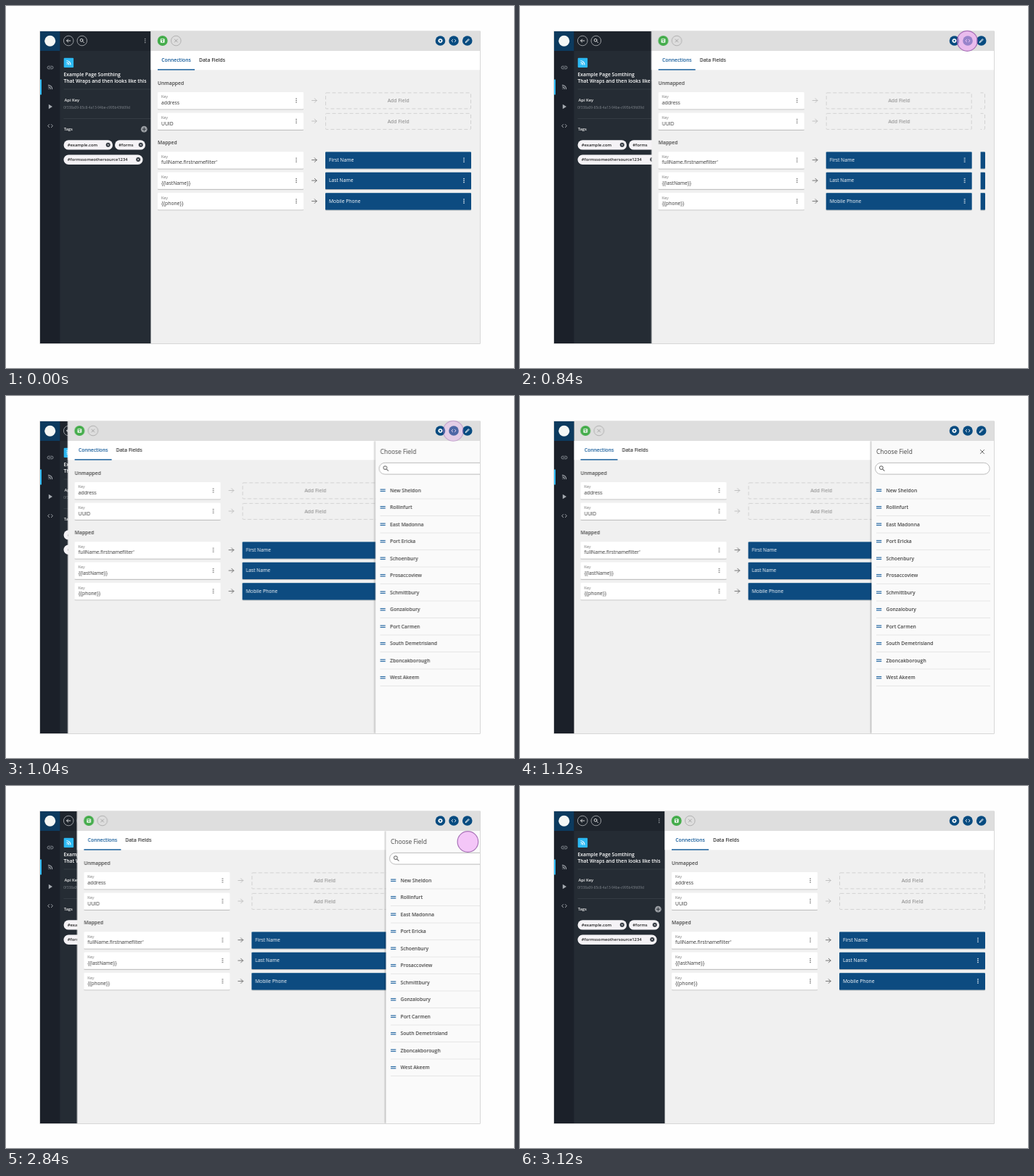
Write an HTML page that moves like this. It is 700 px wide and 500 px high and loops after 4.6 s.

```html
<!DOCTYPE html>
<html lang="en">
<head>
<meta charset="utf-8">
<title>Field mapping</title>
<style>
html, body { margin: 0; width: 100%; height: 100%; overflow: hidden; background: #fefefe; }
svg { display: block; width: 700px; height: 500px; font: 6.75px "Open Sans", sans-serif; }
.semi { font-weight: 600; }
.small { font-size: 5.8px; }
.line { fill: none; stroke: currentColor; stroke-linecap: round; stroke-linejoin: round; }
.panel { animation: slide 4.6s ease-in-out infinite; }
.drawer { animation: drawer 4.6s ease-in-out infinite; }
.tap {
  fill: #f0a6f7; stroke: #8f4fa3; stroke-width: 1.2;
  fill-opacity: 0; stroke-opacity: 0;
  animation: tap 4.6s linear infinite;
}
.open { animation-delay: .68s; }
.close { animation-delay: 2.68s; }
@keyframes slide {
  0%, 16.087% { transform: translateX(0); }
  24.348%, 59.13% { transform: translateX(-125.5px); }
  67.826%, 100% { transform: translateX(0); }
}
@keyframes drawer {
  0%, 16.087% { transform: translateX(278px); }
  24.348%, 59.13% { transform: translateX(0); }
  67.826% { transform: translateX(205px); }
  67.83%, 100% { transform: translateX(278px); }
}
@keyframes tap {
  0% { fill-opacity: 0; stroke-opacity: .35; }
  3.5% { fill-opacity: .62; stroke-opacity: .75; }
  5.2% { fill-opacity: .72; stroke-opacity: .95; }
  6.1% { fill-opacity: .62; stroke-opacity: .7; }
  9.565%, 100% { fill-opacity: 0; stroke-opacity: 0; }
}
</style>
</head>
<body>
<svg id="stage" viewBox="0 0 700 500"></svg>
<script>
const NAVY = '#074b80', INK = '#333';

const rect = (x, y, w, h, fill, more = '') =>
  `<rect x="${x}" y="${y}" width="${w}" height="${h}" fill="${fill}" ${more}/>`;
const dot = (x, y, r, fill, more = '') =>
  `<circle cx="${x}" cy="${y}" r="${r}" fill="${fill}" ${more}/>`;
const text = (x, y, str, fill = INK, cls = '', more = '') =>
  `<text x="${x}" y="${y}" fill="${fill}" class="${cls}" ${more}>${str}</text>`;
const icon = (x, y, d, color, w = 0.9, scale = 1) =>
  `<path class="line" transform="translate(${x} ${y}) scale(${scale})" d="${d}" color="${color}" stroke-width="${w}"/>`;
const kebab = (x, y, color) => [-2.5, 0, 2.5].map(d => dot(x, y + d, 0.8, color)).join('');
const ring = (x, y, color) => dot(x, y, 6.8, 'none', `stroke="${color}" stroke-width=".8"`);

const ICON = {
  arrow: 'M-3.3 0H3.3M.4-2.9 3.3 0 .4 2.9',
  back: 'M2.6 0H-2.6M-.6-2-2.6 0-.6 2',
  cross: 'M-2-2 2 2M2-2-2 2',
  lens: 'M1.3-.6A1.9 1.9 0 1 1-2.5-.6 1.9 1.9 0 1 1 1.3-.6M.8.8 2.8 2.8',
  code: 'M-1.4-2-3.4 0-1.4 2M1.4-2 3.4 0 1.4 2',
  link: 'M-.8-1.9H-2.1A1.9 1.9 0 0 0-2.1 1.9H-.8M.8-1.9H2.1A1.9 1.9 0 0 1 2.1 1.9H.8M-1.5 0H1.5',
  feed: 'M-2.6-2.6A5.2 5.2 0 0 1 2.6 2.6M-2.6-.2A2.8 2.8 0 0 1 .2 2.6M-2.2 2.2h.1'
};

function row(y, value, target) {
  const mid = y + 11.5;
  let out = rect(209, y, 201, 23.2, '#fff', 'rx="1" filter="url(#lift)"')
    + text(214, y + 8.4, 'Key', '#777', '', 'font-size="5.4"')
    + text(214, y + 17, value)
    + kebab(400, mid, '#666')
    + icon(424.8, mid, ICON.arrow, target ? '#555' : '#b5b5b5', 0.8);
  if (target) {
    out += rect(440, y + .2, 201, 23.2, NAVY, 'rx="1" filter="url(#lift)"')
      + text(445, mid + 2.2, target, '#fff') + kebab(631, mid, '#fff');
  } else {
    out += rect(440.5, y + .9, 200, 22, 'none', 'rx="1" stroke="#cfcfcf" stroke-width=".9" stroke-dasharray="5 3"')
      + text(540.7, mid + 2.6, 'Add Field', '#999', 'semi', 'text-anchor="middle"');
  }
  return out;
}

const panel = rect(199.5, 35, 453.5, 431, '#f0f0f0')
  + rect(199.5, 35, 453.5, 27, '#dedede')
  + rect(199.5, 62, 453.5, 26.3, '#fff')
  + dot(215.7, 48, 7, '#45ad4c')
  + rect(212.9, 45.2, 5.6, 5.6, '#fff', 'rx=".7"')
  + rect(213.8, 46, 3.2, 1.4, '#45ad4c') + dot(215.7, 49.1, 1, '#45ad4c')
  + ring(234.3, 48, '#a5a5a5') + icon(234.3, 48, ICON.cross, '#999', 0.8)
  + text(214.3, 77.4, 'Connections', '#0b5596', 'semi')
  + text(266, 77.4, 'Data Fields', INK, 'semi')
  + rect(209, 87.2, 51, 1.4, '#0b5596')
  + text(209, 108.6, 'Unmapped', '#444', 'semi')
  + text(209, 190.8, 'Mapped', '#444', 'semi')
  + row(119, 'address') + row(147.5, 'UUID')
  + row(201.2, "fullName.firstnamefilter'", 'First Name')
  + row(229.6, '{{lastName}}', 'Last Name')
  + row(258.1, '{{phone}}', 'Mobile Phone');

const chip = (x, y, w, label) => rect(x, y, w, 13.4, '#f5f3f6', 'rx="6.7"')
  + text(x + 5.3, y + 8.7, label, '#222', 'semi small')
  + dot(x + w - 6.3, y + 6.5, 3, '#2a3038')
  + icon(x + w - 6.3, y + 6.5, ICON.cross, '#fff', 1.2, 0.55);

const sidebar = rect(74, 35, 126, 431, '#252c34')
  + rect(74, 35, 126, 27, '#1e242c')
  + ring(86.2, 48, '#b5b8bc') + icon(86.2, 48, ICON.back, '#e8e8e8')
  + ring(104.8, 48, '#b5b8bc') + icon(104.7, 47.8, ICON.lens, '#e8e8e8')
  + kebab(191.7, 48, '#a5a9ae')
  + rect(79.7, 71.7, 13.4, 13.4, '#2cb9f3', 'rx="1"')
  + icon(86.4, 78.4, ICON.feed, '#fff', 1.1)
  + text(79.5, 97.2, 'Example Page Somthing', '#fff', 'semi')
  + text(79.5, 106.3, 'That Wraps and then looks like this', '#fff', 'semi')
  + rect(79.5, 114.6, 120.5, .7, '#3b424a')
  + text(80.5, 132, 'Api Key', '#f0f0f0', 'semi small')
  + text(79.3, 141.8, '0f338a09-85c8-4a13-94be-c995b43fd09d', '#7e848b', '', 'font-size="4.82"')
  + rect(79.5, 155, 120.5, .7, '#3b424a')
  + text(79.7, 172.2, 'Tags', '#f0f0f0', 'semi small')
  + dot(190.3, 170.2, 4.4, '#9a9ea3') + icon(190.3, 170.2, 'M-2.2 0H2.2M0-2.2V2.2', '#252c34', 0.9)
  + chip(79.5, 185.2, 67.5, '#example.com') + chip(150, 185.2, 42, '#forms')
  + chip(79.5, 205.5, 109, '#formssomeothersource1234');

const strip = rect(47, 35, 27.3, 431, '#1b2029')
  + rect(47, 35, 27.3, 27, '#0c3a5e')
  + dot(60.7, 48.3, 7.5, '#f4f7f4')
  + rect(47, 101.5, 2, 21, '#2cb9f3')
  + icon(61, 85, ICON.link, '#8b9198')
  + icon(61, 112, ICON.feed, '#a5aab0', 1.1)
  + '<path d="M58.8 135.7V142.3L64 139Z" fill="#a5aab0"/>'
  + icon(61, 165.6, ICON.code, '#a5aab0', 1);

const towns = ['New Sheldon', 'Rollinfurt', 'East Madonna', 'Port Ericka', 'Schoenbury', 'Prosaccoview',
  'Schmittbury', 'Gonzalobury', 'Port Carmen', 'South Demetrisland', 'Zboncakborough', 'West Akeem'];
const drawer = rect(484.5, 62, 290, 404, '#fafafa', 'filter="url(#edge)"')
  + text(491, 80, 'Choose Field', '#444', '', 'font-size="8.4"')
  + icon(637, 77, ICON.cross, '#666', 0.75, 1.3)
  + rect(489.5, 92.3, 157.7, 15.8, '#fff', 'rx="7.9" stroke="#b5b5b5" stroke-width=".9"')
  + icon(498.6, 99.8, ICON.lens, '#666', 0.85, 1.25)
  + towns.map((name, i) => {
      const y = 130.2 + i * 23.5;
      return rect(491, y - 1.7, 7.2, 1.2, '#2a6ba4') + rect(491, y + .7, 7.2, 1.2, '#2a6ba4')
        + text(504.5, y + 2.3, name, '#444', 'semi')
        + rect(491, y + 11.5, 157, .7, '#dedede');
    }).join('');

const actions = [598.5, 617, 635.7].map(x => dot(x, 48, 6.8, NAVY)).join('')
  + dot(598.5, 48, 2, 'none', 'stroke="#fff" stroke-width="1.6"')
  + dot(598.5, 48, 2.8, 'none', 'stroke="#fff" stroke-width=".7" stroke-dasharray="1.1 1.1"')
  + icon(617, 48, ICON.code, '#fff', 0.9, 0.9)
  + icon(635.7, 48, 'M-2.3 2.3-1.9 1 1.5-2.4 2.4-1.5-1 1.9Z', '#fff', 1);

document.getElementById('stage').innerHTML = `
  <defs>
    <filter id="lift" x="-5%" y="-20%" width="110%" height="150%">
      <feDropShadow dx="0" dy=".8" stdDeviation=".6" flood-opacity=".32"/>
    </filter>
    <filter id="edge" x="-5%" width="110%">
      <feDropShadow dx="-.8" dy="0" stdDeviation="1.2" flood-opacity=".4"/>
    </filter>
    <clipPath id="frame"><rect x="47" y="35" width="606" height="431"/></clipPath>
    <clipPath id="below"><rect x="47" y="62" width="606" height="404"/></clipPath>
    <g id="panel">${panel}</g>
  </defs>
  ${rect(46.8, 35, 606.4, 431.2, '#fff', 'stroke="#c4c4c4" stroke-width=".9"')}
  <g clip-path="url(#frame)">
    <use href="#panel"/>
    ${sidebar}
    <g class="panel"><use href="#panel"/></g>
    ${strip}
    <g clip-path="url(#below)"><g class="drawer">${drawer}</g></g>
    ${actions}
  </g>
  <circle class="tap open" cx="616.3" cy="48.3" r="14"/>
  <circle class="tap close" cx="636.4" cy="77" r="14.3"/>`;
</script>
</body>
</html>
```
